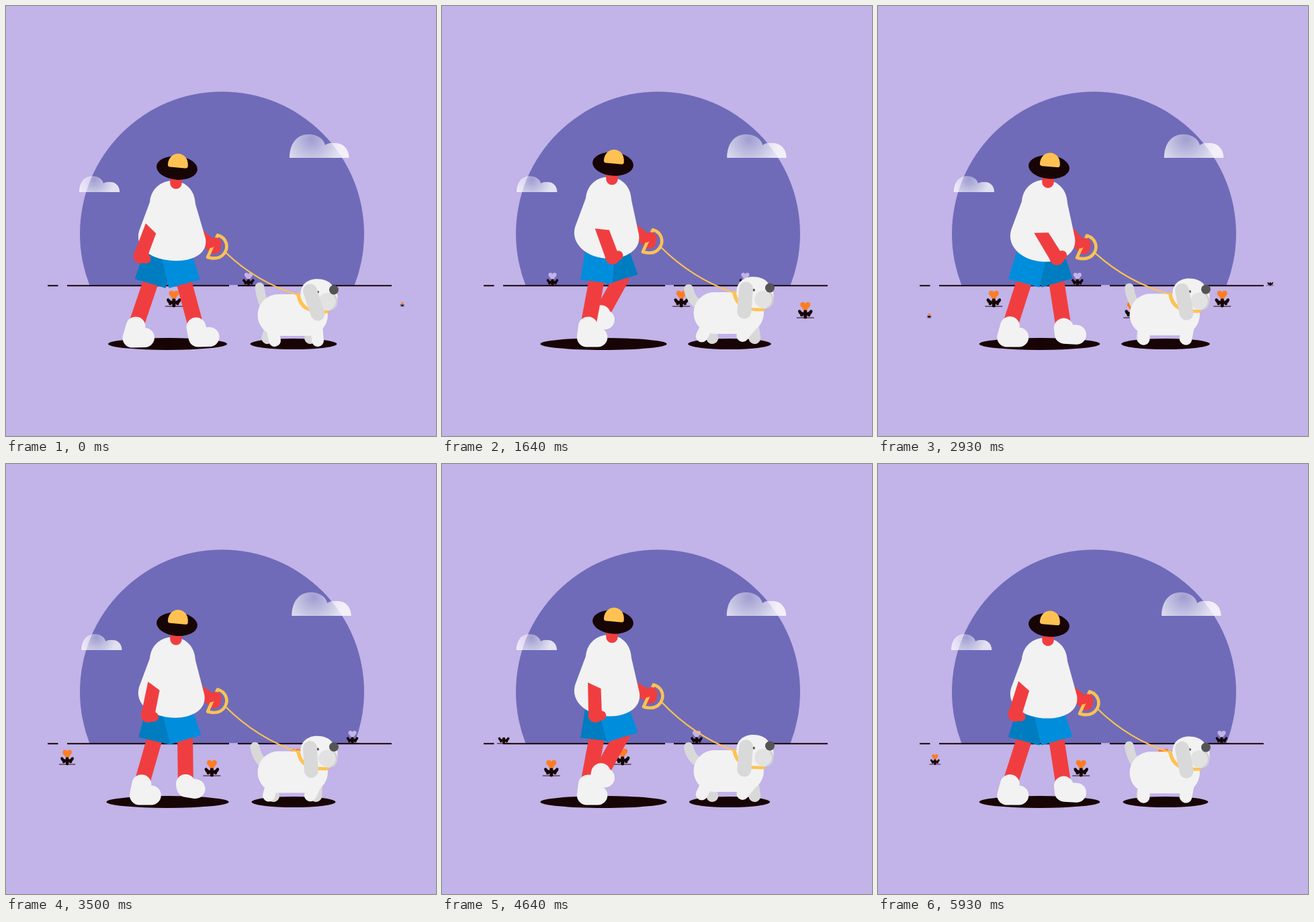
Animation, 640 px wide and 640 px high, one loop 6000 ms. Source, as an HTML page with a canvas:

```html
<!DOCTYPE html>
<html lang="en">
<head>
<meta charset="utf-8">
<title>Dog walk</title>
<style>
html, body { margin: 0; height: 100%; overflow: hidden; background: #c2b3e8; }
canvas { display: block; width: 100%; height: 100%; }
</style>
</head>
<body>
<canvas width="640" height="640"></canvas>
<script>
const g = document.querySelector('canvas').getContext('2d');
const SKY = '#c2b3e8', INK = '#170405', RED = '#f03e40', WHITE = '#f2f2f2', GREY = '#d9d9d9',
  YELLOW = '#ffc252', BLUE = '#008ddc', NAVY = '#007cc1', ORANGE = '#ff7d22';
const LOOP = 6000, STRIDE = 1200, HIP = [241, 325], SHOULDER = [248, 270];

// Leg over one stride: phase, thigh angle, ankle x y, heel x y, toe x y
const LEG = [
  [0, -15.6, 283, 478, 286, 493, 303, 492.5],
  [.036, -13.5, 279, 479, 282, 493, 300.5, 492.5],
  [.2, -4, 249, 477, 249, 493, 266.5, 493],
  [.369, 7, 217, 477, 215, 493, 231.5, 493],
  [.393, 10, 209, 477, 207, 493, 224.5, 493],
  [.441, 15, 196.5, 476.5, 192, 493, 210, 493],
  [.5, 16.6, 193, 477, 188, 494, 206.5, 493.5],
  [.536, 15.8, 193.5, 476, 188, 491.5, 206.5, 491],
  [.62, 10, 194, 468, 188, 482, 201, 488],
  [.75, -8, 209, 452, 204, 461, 209, 470],
  [.869, -17.5, 237, 460, 236, 465, 243, 467],
  [.893, -17.5, 255, 471, 256, 473, 264, 476],
  [.941, -16, 276, 479, 277, 488, 295, 489]
];
// Arms over one stride: phase, upper arm angle, forearm angle, handle x y
const ARM = [
  [0, 28, 20, 315, 341],
  [.18, 18.5, -2, 316, 337],
  [.369, 8, -21, 313.8, 339],
  [.393, 6, -25, 312.5, 340.5],
  [.441, 4.2, -32, 311, 343],
  [.536, 4.2, -33.7, 310, 343.5],
  [.7, 9, -21, 313, 336],
  [.869, 18, -2, 315, 334.5],
  [.941, 26.5, 16.5, 315, 340]
];

// Smooth cyclic interpolation through the rows
function pose(rows, p) {
  p -= Math.floor(p);
  const n = rows.length;
  const at = i => rows[(i + n) % n].map((v, c) => c ? v : v + Math.floor(i / n));
  let i = n - 1;
  while (rows[i][0] > p) i--;
  const [a, b, c, d] = [at(i - 1), at(i), at(i + 1), at(i + 2)];
  const h = c[0] - b[0], u = (p - b[0]) / h;
  return b.map((v, k) => {
    const m = (c[k] - a[k]) / (c[0] - a[0]) * h, e = (d[k] - v) / (d[0] - b[0]) * h;
    return v + u * m + u * u * (3 * (c[k] - v) - 2 * m - e) + u ** 3 * (2 * (v - c[k]) + m + e);
  }).slice(1);
}

const turn = (x, y, deg) => {
  const r = deg * Math.PI / 180, c = Math.cos(r), s = Math.sin(r);
  return [x * c - y * s, x * s + y * c];
};
function fill(d, color) {
  g.fillStyle = color;
  g.fill(new Path2D(d));
}
function stroke(d, color, width) {
  g.strokeStyle = color;
  g.lineWidth = width;
  g.stroke(new Path2D(d));
}
function oval(x, y, rx, ry, color, deg = 0) {
  g.fillStyle = color;
  g.beginPath();
  g.ellipse(x, y, rx, ry, deg * Math.PI / 180, 0, 7);
  g.fill();
}
const dot = (x, y, r, color) => oval(x, y, r, r, color);
const poly = (points, color) => fill('M' + points.join('L') + 'Z', color);
const rope = (points, color, width) => stroke('M' + points.join('L'), color, width);
function place(x, y, scale, deg, draw) {
  g.save();
  g.translate(x, y);
  g.scale(scale, scale);
  g.rotate(deg * Math.PI / 180);
  draw();
  g.restore();
}

const haze = g.createRadialGradient(33, 7, 2, 33, 9, 44);
haze.addColorStop(0, 'rgba(255,255,255,.36)');
haze.addColorStop(1, 'rgba(255,255,255,.8)');
const cloud = () => fill('M0 35C0 14 11 0 28 0C42 0 51 7 53 16C58 12 63 13 68 13C80 13 88.5 22 88.5 35Z', haze);

function flower(bloom) {
  stroke('M-12.5 0H12.5', INK, 1.2);
  stroke('M0 -10V-1', INK, 5);
  stroke('M-8.5 -9.5Q-7 -5 0 -6Q7 -5 8.5 -9.5', INK, 4.5);
  dot(-5.5, -4, 2.3, INK);
  dot(5.5, -4, 2.3, INK);
  dot(-3.7, -19.6, 3.7, bloom);
  dot(3.7, -19.6, 3.7, bloom);
  poly([[-7, -18], [0, -21], [7, -18], [2.5, -11.5], [-2.5, -11.5]], bloom);
}

function flowerRow(t, y, first, gap, speed, size, bloom) {
  for (let k = 0; k < 4; k++) {
    const x = first + gap * k - speed * t;
    const s = Math.min(1, (x - 70) / 23, (596 - x) / 24);
    if (s > 0) place(x, y, s * size, 0, () => flower(bloom));
  }
}

function scenery(t) {
  g.fillStyle = SKY;
  g.fillRect(0, 0, 640, 640);
  g.save();
  g.beginPath();
  g.rect(0, 0, 640, 416);
  g.clip();
  dot(321.5, 339, 211.5, '#6f6bb9');
  g.restore();
  const drift = 4 * (1 - Math.abs(1 - t / 3));
  place(422 + drift, 191, 1, 0, cloud);
  place(109 + drift, 253.2, .68, 0, cloud);
  g.lineCap = 'butt';
  stroke('M332 416.3H345', SKY, 2);
  stroke('M62 416.3H77.5M91 416.3H332M345 416.3H574', INK, 2);
  g.lineCap = 'round';
  flowerRow(t, 416, 361, 287, 119.8, .82, SKY);
  flowerRow(t, 447, 250, 340, 142.5, 1, ORANGE);
  flowerRow(t, 464, 445.5, 302, 126, 1, ORANGE);
}

function dog(lift, sway) {
  const y = -lift * .52;
  const paw = (hip, x, py, color) => rope([[hip, 476 + y], [x, py]], color, 18);
  const tx = 377.5 - 11 * sway, ty = 418.5 + 6 * sway + y;
  stroke(`M386 ${450 + y}Q${tx + 2} ${ty + 16} ${tx} ${ty}`, GREY, 14);
  paw(396, 389 + 14 * sway, 494, GREY);
  paw(462, 453 + 13 * sway, 494, GREY);
  paw(396, 400 - 14 * sway, 498 - 7 * sway, WHITE);
  paw(462, 464 - 17.5 * sway, 498 - 7.5 * sway, WHITE);
  place(0, y, 1, 0, () => {
    g.fillStyle = WHITE;
    g.beginPath();
    g.roundRect(374.5, 429, 104.5, 62, 31);
    g.fill();
    stroke('M435 430C438 449 452 456 478 454.5', YELLOW, 5.5);
    fill('M438.5 430C437 402 474 401 485 415L493 428Q496 446 483 453L456 452Q441 446 438.5 430', WHITE);
    oval(484, 440, 9.5, 12.5, '#d0d0d0');
    dot(478, 439.7, 12.8, '#e2e2e2');
    dot(464, 425.8, 2, '#555');
    dot(488, 422.5, 7, '#555');
    rope([[452.5, 424], [464 - 15 * sway, 458]], GREY, 21);
  });
}

function leg(p, lift, color) {
  const [thigh, ax, ay, hx, hy, tx, ty] = pose(LEG, p);
  const onThigh = (x, y) => {
    const [dx, dy] = turn(x, y, thigh);
    return [HIP[0] + dx, HIP[1] - lift + dy];
  };
  rope([onThigh(0, 89), [ax, ay]], RED, 23);
  rope([[ax, ay], [hx, hy], [tx, ty]], WHITE, 29);
  poly([[-22, 40], [22, 40], [24, 92], [-24, 92]].map(v => onThigh(...v)), color);
}

function nearArm(upper, fore) {
  const [dx, dy] = turn(0, 69, upper);
  const ex = SHOULDER[0] + dx, ey = SHOULDER[1] + dy;
  const [cx, cy] = turn(10.7, 0, upper * 1.9 - 9);
  const local = (x, y) => {
    const [a, b] = turn(x, y, fore);
    return [ex + a, ey + b];
  };
  poly([[ex - cx, ey - cy], [ex + cx, ey + cy], local(9.5, 44), local(-10.5, 44)], RED);
  dot(...local(0, 44), 11, RED);
  dot(...local(8.5, 45), 7.2, RED);
}

function person(p, lift) {
  const [upper, fore, hx, hy] = pose(ARM, p);
  const flare = 4 * Math.max(0, Math.cos(p * 2 * Math.PI)) ** 4;
  leg(p + .5, lift, NAVY);
  leg(p, lift, BLUE);
  place(0, -lift, 1, 0, () => {
    rope([[284, 338], [hx - 8, hy + 16]], RED, 18);
    dot(hx - 5, hy + 18, 10, RED);
    place(hx, hy, 1, 0, () => {
      stroke('M0 0C13 4 17 17 10 27C5 34 -4 36 -15 33Z', YELLOW, 4.6);
      dot(-3, 10.5, 7, RED);
      dot(-10, 12, 7, RED);
      dot(0, 12, 6, RED);
    });
    const r = 293 + flare, low = 382 - flare * .7;
    fill(`M214 292C218 249 280 249 282 295L${r} 346C${r + 4} 370 ${r - 21} ${low} ${250 + flare} ${low}` +
      `C216 ${low} 191 360 198 335Z`, WHITE);
    rope([[253, 257], [253, 263.5]], RED, 17.5);
    oval(254.5, 241, 30.5, 17.5, INK, 5);
    place(256, 235, 1, 5, () =>
      fill('M-15 2C-15 -21 15 -21 15 2Q15 5.5 11 5.5H-11Q-15 5.5 -15 2', YELLOW));
    nearArm(upper, fore);
  });
  return [hx + 12, hy + 26 - lift];
}

function frame() {
  const ms = performance.now() % LOOP, p = ms % STRIDE / STRIDE;
  const lift = 10.8 * Math.sin(p * 2 * Math.PI) ** 2;
  const sway = Math.tanh(lift / 3) ** 1.3;
  g.lineCap = 'round';
  g.lineJoin = 'round';
  scenery(ms / 1000);
  oval(240.5, 503, 88.5 + lift * .95, 9, INK);
  oval(428, 503, 65.7 - 1.25 * Math.cos(p * 2 * Math.PI) - lift * .8, 8, INK);
  dog(lift, sway);
  const [x, y] = person(p, lift);
  const ex = 434.5, ey = 430 - lift * .52;
  stroke(`M${x} ${y}Q${(x + ex) / 2 - 7} ${(y + ey) / 2 + 13} ${ex} ${ey}`, YELLOW, 2.2);
  requestAnimationFrame(frame);
}
frame();
</script>
</body>
</html>
```
